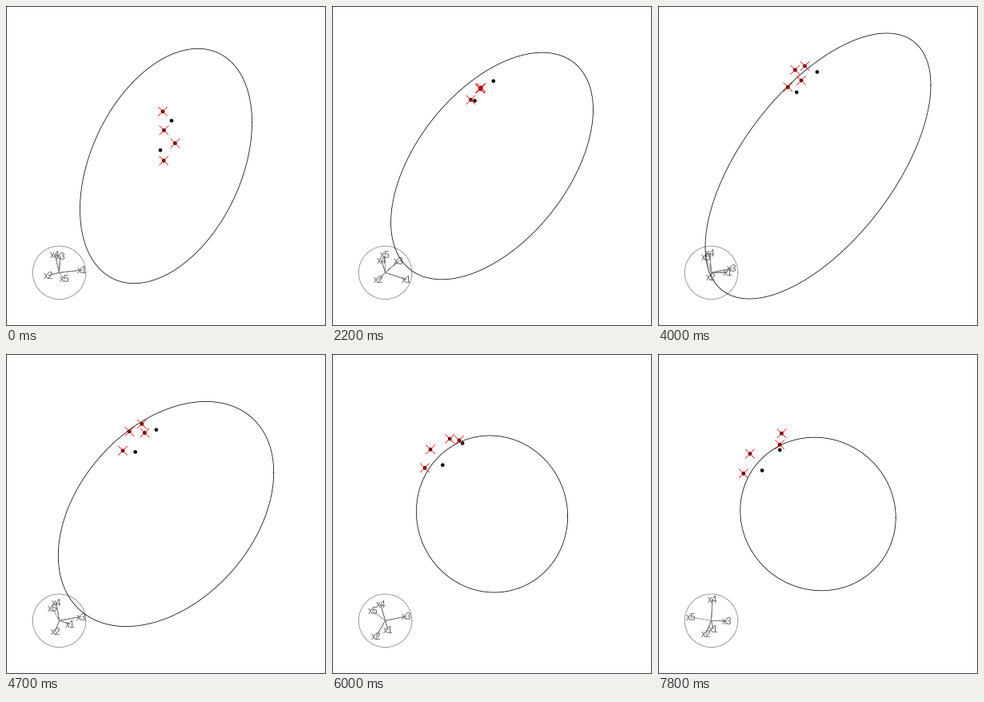
These frames come from a looping animation (400x400 px, 7900 ms). A matplotlib script:

```python
import numpy as np
import matplotlib.pyplot as plt
from matplotlib.animation import FuncAnimation
from matplotlib.patches import Circle

SIZE, DPI = 400, 100
FRAMES, STEP = 79, 100
PX = 72 / DPI
THIN = 0.75 * PX
GREY, TEXT = "#7f7f7f", "#6a6a6a"
MID = SIZE / 2
HUB, RADIUS = np.array([66.6, 333.3]), 33.3

# Five-dimensional data; every position follows from the tour below
inside = np.array([(.14, -.07, .68, 2.66, 2.53),
                   (-.18, .54, -.11, 1.92, 2.55)])
outliers = np.array([(.16, .07, -.02, 3.62, 1.94),
                     (-.33, -.48, .17, 2.50, 2.21),
                     (.35, .23, -.42, 2.64, 3.08),
                     (.01, .83, -.55, 1.94, 3.06)])
points = np.vstack([outliers, inside])

# Tour: projection planes as (x, y) rows over the five variables, in pixels
PLANES = {
    0: [(28.5, -13.5, 1, -5.5, 6.3), (-3.3, 3.5, -21, -23, 7.7)],
    1000: [(24.5, -8.5, 8.5, -11.5, 14.5), (7.7, 13.7, -20.3, -19.3, -5.3)],
    2200: [(26.5, -8.5, 16.5, -4.7, -.5), (8.7, 8.7, -14.3, -15.3, -22.3)],
    4000: [(20, -.5, 25.5, -1.8, -6.5), (-.3, 5.7, -5.3, -24.3, -19.3)],
    5300: [(7.5, -9.7, 27.5, -5.7, -11.5), (8.7, 19.7, -5.3, -21.3, -13.3)],
    6000: [(3.5, -11.5, 26, -5.8, -16), (11.7, 19.7, -5.3, -20.3, -12.3)],
    7800: [(2.5, -7, 19.5, 1.5, -26), (10.7, 16.7, .7, -26.3, -4.3)],
}

# Ellipse outline: half width, half height, shear angle
OUTLINE = {
    0: (107.5, 146.7, .38), 1000: (125.7, 122.8, .43), 2200: (126.4, 141.8, .52),
    3300: (144, 181, .62), 4000: (141, 166, .655), 4300: (149.5, 161.5, .56),
    5300: (97, 104.3, .105), 6000: (94.6, 98, -.03), 7800: (97.2, 95.8, -.045),
}


def path(keys):
    """Smooth function of time through the given keys (cubic Hermite)."""
    t = np.array(list(keys), float)
    v = np.array(list(keys.values()), float)
    slope = np.gradient(v, t, axis=0)

    def at(ms):
        i = min(np.searchsorted(t, ms, "right") - 1, len(t) - 2)
        h = t[i + 1] - t[i]
        s = (ms - t[i]) / h
        a, b = v[i], v[i + 1]
        ma, mb = slope[i] * h, slope[i + 1] * h
        return (a + s * ma + s**2 * (3 * (b - a) - 2 * ma - mb)
                + s**3 * (2 * (a - b) + ma + mb))

    return at


plane, ellipse = path(PLANES), path(OUTLINE)

fig = plt.figure(figsize=(SIZE / DPI, SIZE / DPI), dpi=DPI, facecolor="white")
ax = fig.add_axes([0, 0, 1, 1])
ax.set_xlim(0, SIZE)
ax.set_ylim(SIZE, 0)
ax.axis("off")


def line(color, z):
    return ax.plot([], [], color=color, lw=THIN, zorder=z, snap=False)[0]


theta = np.linspace(0, 2 * np.pi, 181)
ring = np.linspace(0, 2 * np.pi, 50)
lo, hi = 0.5, SIZE - 0.5
line("black", 6).set_data([lo, hi, hi, lo, lo], [lo, lo, hi, hi, lo])
line(GREY, 1).set_data(HUB[0] + RADIUS * np.cos(ring), HUB[1] + RADIUS * np.sin(ring))

spokes = line(GREY, 1)
labels = [ax.text(0, 0, f"x{k}", family="Liberation Sans", size=12 * PX, color=TEXT,
                  ha="center", va="baseline", zorder=2) for k in range(1, 6)]
outline = line("black", 3)
dots = [ax.add_patch(Circle((0, 0), 2.3, color="black", lw=0, zorder=4)) for _ in points]
crosses = line("red", 5)

# Two diagonal strokes, with a gap after each
ARM = 5.5 * np.array([(-1, -1), (1, 1), (np.nan, np.nan),
                      (-1, 1), (1, -1), (np.nan, np.nan)])


def draw(n):
    ms = n * STEP
    basis = plane(ms).T

    tips = HUB + basis
    spokes.set_data(*np.stack([np.tile(HUB, (5, 1)), tips], axis=1).reshape(-1, 2).T)
    for label, (x, y) in zip(labels, tips):
        label.set_position((x + 0.5, y + 4.3))

    w, h, shear = ellipse(ms)
    outline.set_data(MID + w * np.cos(theta), MID - h * np.sin(theta + shear))

    spots = MID + points @ basis
    for dot, spot in zip(dots, spots):
        dot.set_center(spot)
    marked = spots[:len(outliers)]
    crosses.set_data(*(marked[:, None] + ARM).reshape(-1, 2).T)
    return [spokes, *labels, outline, *dots, crosses]


anim = FuncAnimation(fig, draw, frames=FRAMES, interval=STEP, repeat=True,
                     repeat_delay=0, blit=False)
plt.show()
```
